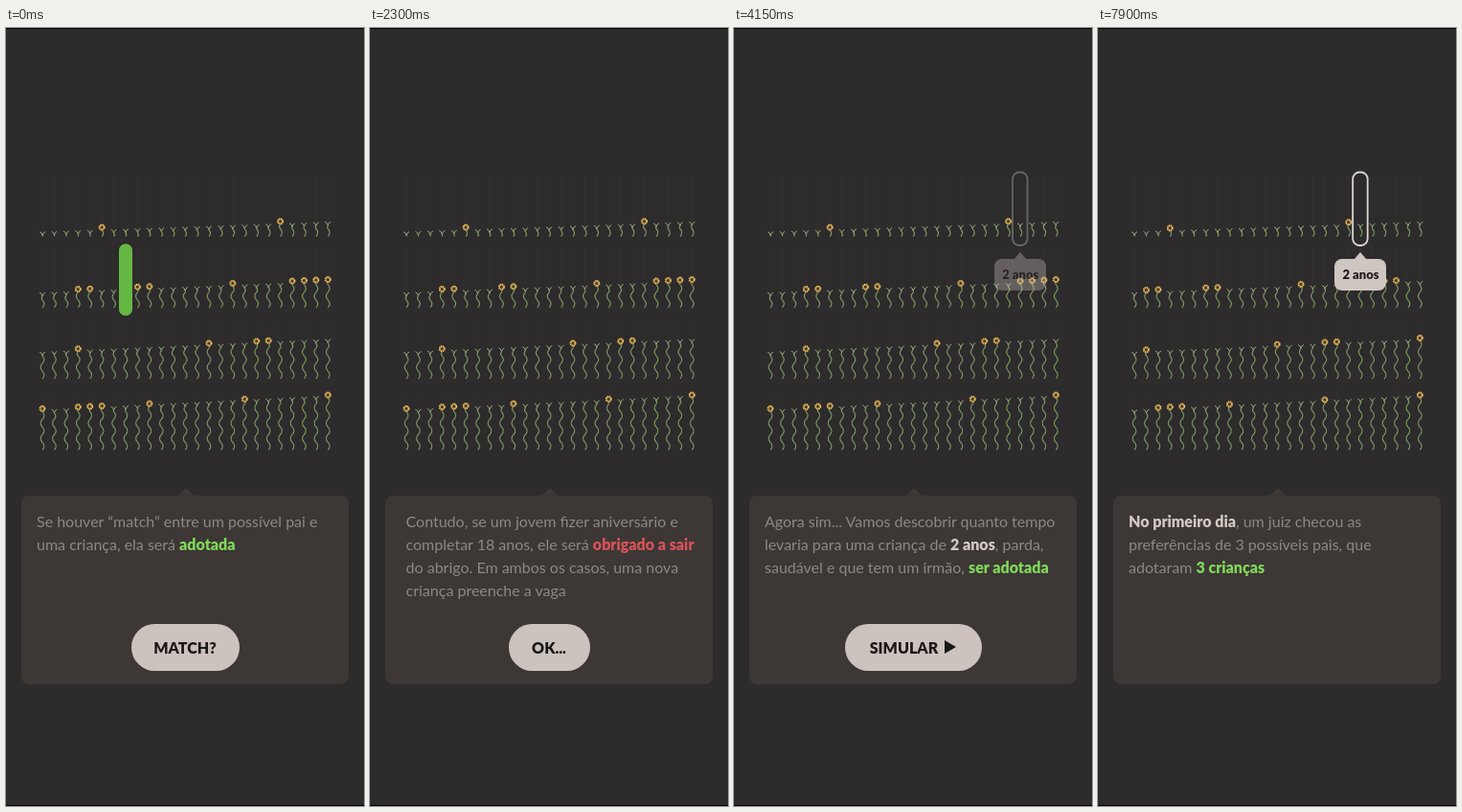
Animation of 374x812 px, one loop 8000 ms. Source, as an HTML page:

```html
<!DOCTYPE html>
<html lang="pt">
<head>
<meta charset="utf-8">
<style>
html, body { margin: 0; width: 100%; height: 100%; overflow: hidden; background: #2d2b2c; }
body { position: relative; font: 16px/24px Lato, sans-serif; }
svg, div { position: absolute; }
#garden { left: 0; top: 0; }
#card { left: 16px; top: 488px; width: 342px; height: 197px; border-radius: 8px; background: #3d3735; }
#view { left: 30px; top: 496px; width: 314px; height: 112px; overflow: hidden; }
.slide { top: 7px; white-space: nowrap; color: #8f8884; }
.slide b { color: #d3cac5; font-weight: 900; }
.slide .g { color: #80d85a; }
.slide .r { color: #d9535a; }
.btn { top: 622px; height: 48.5px; border-radius: 25px; background: #cdc3be; color: #1b1818;
  font-weight: 900; line-height: 50px; text-align: center; }
.btn svg { position: static; margin-left: 7px; }
#tip { top: 241px; width: 54px; height: 32.5px; border-radius: 8px; background: #d0c6c1; color: #1f1b1b;
  font-weight: 900; font-size: 13px; line-height: 33px; text-align: center; }
#tip svg { left: 20px; top: -7px; }
</style>
</head>
<body>
<svg id="garden" width="374" height="812"></svg>
<div id="tip">2 anos<svg width="14" height="8"><path d="M0 8L7 0L14 8Z" fill="#d0c6c1"/></svg></div>
<div id="card"></div>
<div id="view"></div>
<script>
const LOOP = 8000, COLS = 25, PITCH = 12.43, WIDTH = 314, SLIDE = 500;
const starts = [45, 1887, 3646, 5398];
const flowers = new Set([5, 20, 28, 29, 33, 34, 41, 46, 47, 48, 49, 53, 64, 68, 69, 75, 78, 79, 80, 84, 92, 99]);
const texts = [
  'Se houver “match” entre um possível pai e<br>uma criança, ela será <b class="g">adotada</b>',
  'O “match” acontece quando há uma criança<br>com todas as <b>características que os pais</b><br><b>querem</b> – como idade, existência de irmãos<br>ou deficiências',
  'Contudo, se um jovem fizer aniversário e<br>completar 18 anos, ele será <b class="r">obrigado a sair</b><br>do abrigo. Em ambos os casos, uma nova<br>criança preenche a vaga',
  'Agora sim... Vamos descobrir quanto tempo<br>levaria para uma criança de <b>2 anos</b>, parda,<br>saudável e que tem um irmão, <b class="g">ser adotada</b>',
  '<b>No primeiro dia</b>, um juiz checou as<br>preferências de <span id="parents">0</span> possíveis pais, que<br>adotaram <b class="g"><span id="kids">1</span> crianças</b>'
];
const play = '<svg width="12" height="14"><path d="M0 0L12 7L0 14Z" fill="#1b1818"/></svg>';
const labels = [['MATCH?', 113], ['ENTENDI', 119], ['OK...', 85], ['SIMULAR' + play, 143]];

const $ = id => document.getElementById(id);
const garden = $('garden');
const clamp = v => Math.max(0, Math.min(1, v));
const ramp = (t, a, b) => clamp((t - a) / (b - a));
const lerp = (a, b, k) => a + (b - a) * k;
const smooth = k => k * k * (3 - 2 * k);

// cubic-bezier(.25, .1, .25, 1)
function ease(x) {
  const curve = (u, a, b) => 3 * a * u * (1 - u) ** 2 + 3 * b * u * u * (1 - u) + u ** 3;
  let lo = 0, hi = 1;
  for (let i = 0; i < 24; i++) {
    const mid = (lo + hi) / 2;
    if (curve(mid, .25, .25) < x) lo = mid; else hi = mid;
  }
  return curve(lo, .1, 1);
}

function shape(tag, attrs, parent = garden) {
  const el = document.createElementNS('http://www.w3.org/2000/svg', tag);
  for (const k in attrs) el.setAttribute(k, attrs[k]);
  parent.append(el);
  return el;
}

function box(cls, html, css) {
  const el = document.createElement('div');
  el.className = cls;
  el.innerHTML = html;
  Object.assign(el.style, css);
  return el;
}

const slotX = n => 38 + (n % COLS) * PITCH;
const slotY = n => 217.5 + Math.floor(n / COLS) * 74.3;
const reach = n => 7.5 + .385 * n + .0012 * n * n;

function stem(h) {
  let d = 'M0 0', y = 0, side = 1;
  while (y < h) {
    const s = Math.min(8, h - y);
    d += `q${side * s * .47} ${-s / 2} 0 ${-s}`;
    y += s;
    side = -side;
  }
  return d;
}

function makePlant(n) {
  const g = shape('g', {});
  const body = shape('path', { fill: 'none', stroke: '#7f9c66', 'stroke-width': 1.1 }, g);
  const top = shape('g', {}, g);
  if (flowers.has(n)) {
    shape('circle', { r: 2.5, fill: '#4a3420', stroke: '#e6bd5c', 'stroke-width': 2, 'stroke-dasharray': '1.5 .46' }, top);
  } else {
    shape('path', { d: 'M-3 0Q-.5 .6 0 4Q.5 .6 3 0', fill: 'none', stroke: '#93a878', 'stroke-width': 1 }, top);
  }
  return { n, g, body, top, slot: -1 };
}

function place(p, slot, alpha) {
  p.g.setAttribute('opacity', alpha);
  if (p.slot === slot) return;
  p.slot = slot;
  const a = Math.floor(slot), k = slot - a;
  const x = lerp(slotX(a), slotX(a + 1), k), y = lerp(slotY(a), slotY(a + 1), k);
  const bloom = flowers.has(p.n);
  const h = bloom ? reach(slot) : reach(slot) * 1.04 - 3;
  p.g.setAttribute('transform', `translate(${x} ${y})`);
  p.body.setAttribute('d', stem(h - (bloom ? 3 : 4)));
  p.top.setAttribute('transform', `translate(0 ${-h})`);
}

const pill = (n, color) => shape('rect', {
  x: slotX(n) - 6.5, y: slotY(n) - 66, width: 13, height: 74, rx: 6, fill: color, stroke: color
});

// static scenery
for (let n = 0; n < 100; n++) {
  shape('path', { d: `M${slotX(n)} ${slotY(n) - 64}v64`, stroke: '#323031', opacity: n < 50 ? 1 : .6 });
}
const plants = Array.from({ length: 100 }, (_, n) => makePlant(n));
const green = pill(32, '#66b844'), red = pill(99, '#c8403f');
red.setAttribute('fill-opacity', .7);
const marker = shape('rect', { y: 150.5, width: 15.5, height: 76.5, rx: 7, fill: 'none', stroke: '#ddd5d1', 'stroke-width': 1.8 });
shape('path', { d: 'M179 488.5L188 480L197 488.5Z', fill: '#3d3735' });
shape('path', { d: 'M0 .5H374M0 811.5H374', stroke: '#000' });

const slides = texts.map(html => box('slide', html, {}));
$('view').append(...slides);
const buttons = labels.map(([html, w]) => box('btn', html, { width: w + 'px', left: 187 - w / 2 + 'px' }));
document.body.append(...buttons);

function drawPlants(t) {
  const one = smooth(ramp(t, 6450, 6800)), two = smooth(ramp(t, 7250, 7600));
  for (const p of plants) {
    const n = p.n;
    let slot = n, alpha = 1;
    if (n < 2) {
      // leaves the front and comes back in a free slot
      const k = n ? two : one;
      slot = k < .5 ? n * (1 - one) : n ? 98 : 73 + (1 - two);
      alpha = Math.abs(1 - 2 * k);
    } else if (n < 75) {
      slot = n - one - two;
    } else if (n < 99) {
      slot = n - two;
    }
    if (n === 84) alpha = 1 - ramp(t, 6200, 6340) + ramp(t, 7250, 7500);
    place(p, slot, alpha);
  }
  const x = slotX(21) - PITCH * (one + two);
  marker.setAttribute('x', x - 8);
  $('tip').style.left = x - 26.7 + 'px';
}

function draw(t) {
  const shift = starts.reduce((s, a) => s + ease(ramp(t, a, a + SLIDE)), 0);
  slides.forEach((el, i) => {
    el.style.transform = `translateX(${2 + (i - shift) * WIDTH}px)`;
  });
  buttons.forEach((el, i) => {
    const out = 1 - ramp(t, starts[i] + 180, starts[i] + 330);
    const into = i ? ramp(t, starts[i - 1] + 180, starts[i - 1] + 330) : 1;
    el.style.opacity = Math.min(into, out);
  });

  green.setAttribute('opacity', 1 - ramp(t, 45, 170));
  const pulse = t < 2400 ? 0 : (1 - Math.cos((t - 2400) / 810 * 2 * Math.PI)) / 2;
  red.setAttribute('opacity', pulse * (1 - ramp(t, 3645, 3758)));

  const shown = ramp(t, 4050, 4350);
  marker.setAttribute('opacity', shown);
  $('tip').style.opacity = shown;

  const count = times => times.filter(a => t >= a).length;
  $('parents').textContent = count([6450, 7000, 7550]);
  $('kids').textContent = 1 + count([7000, 7550]);
  drawPlants(t);
}

const begin = performance.now();
function tick() {
  draw((performance.now() - begin) % LOOP);
  requestAnimationFrame(tick);
}
tick();
</script>
</body>
</html>
```
